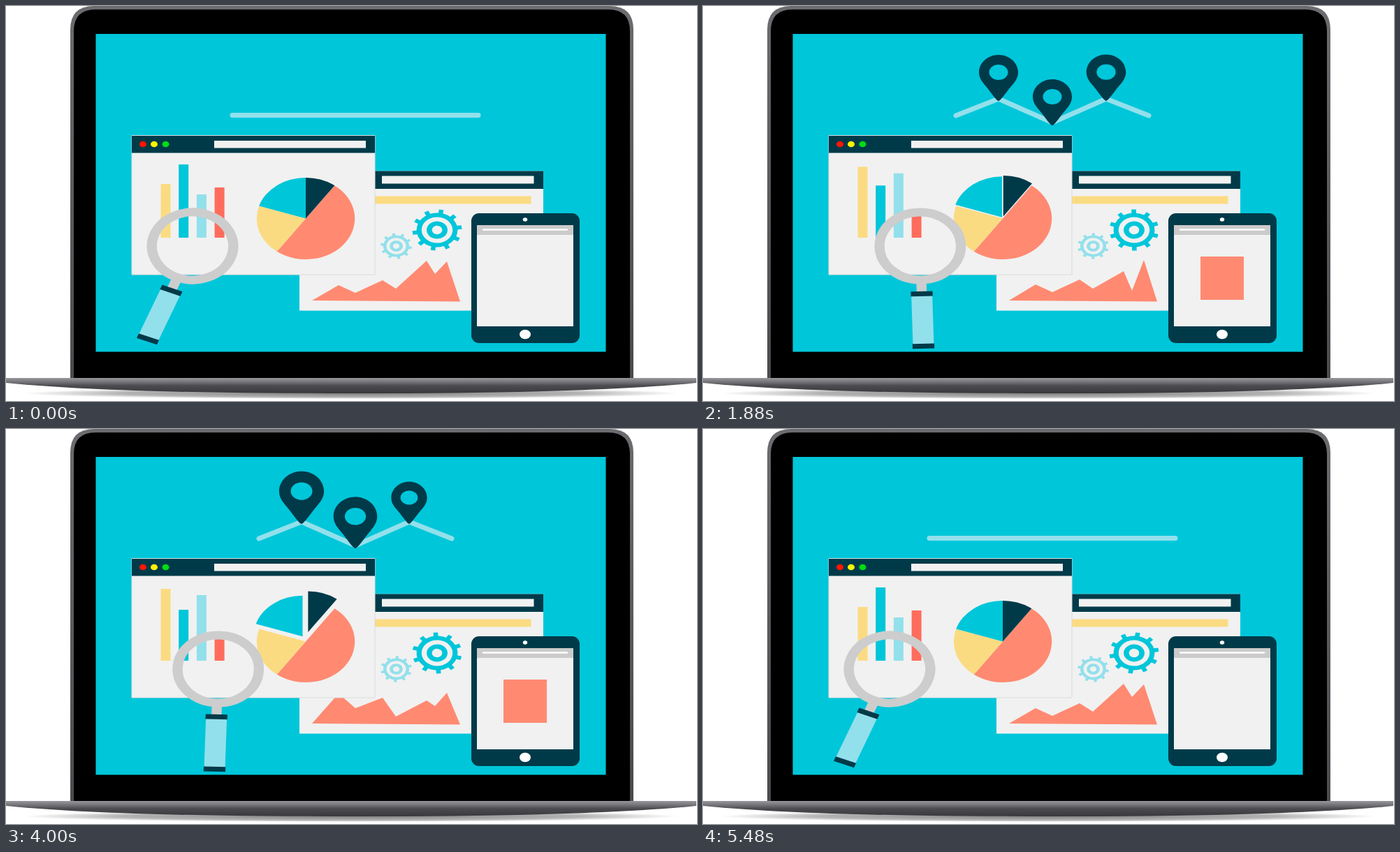
An HTML page for the animation above (5.52 s loop, 989 px wide and 566 px high).

```html
<!DOCTYPE html>
<html lang="en">
<head>
<meta charset="utf-8">
<title>Laptop dashboard</title>
<style>
html, body { margin: 0; width: 100%; height: 100%; overflow: hidden; background: #fff; }
svg { display: block; width: 989px; height: 566px; }
.dark { fill: #003a49; }
.teal { fill: #00c6da; }
.light { fill: #92e0eb; }
.paper { fill: #f1f1f1; }
.yellow { fill: #fbdb82; }
.coral { fill: #ff8a71; }
.red { fill: #ff6c5c; }
</style>
</head>
<body>
<svg viewBox="0 0 989 566">
  <defs>
    <linearGradient id="rim" x2="0" y2="1">
      <stop offset="0" stop-color="#6c6b6f"/><stop offset="1" stop-color="#4b4a4e"/>
    </linearGradient>
    <linearGradient id="base" x2="0" y2="1">
      <stop offset="0" stop-color="#98979b"/><stop offset=".3" stop-color="#6f6e72"/>
      <stop offset=".5" stop-color="#4c4b4f"/><stop offset="1" stop-color="#39383c"/>
    </linearGradient>
    <radialGradient id="shadow">
      <stop offset="0" stop-opacity=".5"/><stop offset=".7" stop-opacity=".3"/>
      <stop offset="1" stop-opacity="0"/>
    </radialGradient>
    <g id="pin">
      <path class="dark" d="M0 0C-3 0 -12 -14 -19 -22C-25 -29 -28 -34 -28 -41C-28 -55 -15 -66 0 -66S28 -55 28 -41C28 -34 25 -29 19 -22C12 -14 3 0 0 0Z"/>
      <ellipse class="teal" cy="-41" rx="13.5" ry="11"/>
    </g>
  </defs>

  <!-- laptop -->
  <ellipse cx="494" cy="555" rx="470" ry="8" fill="url(#shadow)"/>
  <path d="M92 535V34Q92 0 126 0H864Q898 0 898 34V535Z" fill="url(#rim)"/>
  <path d="M97 533V36Q97 5 128 5H862Q893 5 893 36V533Z"/>
  <path d="M0 533H988V540C868 552 688 555 494 555S120 552 0 540Z" fill="url(#base)"/>
  <path class="teal" d="M128.5 40H858.5V495.5H128.5Z"/>

  <polyline id="route" fill="none" stroke="#92e0eb" stroke-width="7" stroke-linecap="round" stroke-linejoin="round"/>
  <g id="pins"></g>

  <!-- back window -->
  <path class="paper" d="M420 236.5H769V436.5H420Z"/>
  <path class="dark" d="M420 236.5H769V262H420Z"/>
  <path class="paper" d="M538 243.5H755.5V254.5H538Z"/>
  <path class="yellow" d="M440 272.5H751.5V283.5H440Z"/>
  <g id="gears" fill="none"></g>
  <polygon id="hills" class="coral"/>

  <!-- front window -->
  <path class="paper" d="M180 185.5H528V385H180Z" stroke="#d8dcdc"/>
  <path class="dark" d="M180 186H528V210.5H180Z"/>
  <path class="paper" d="M298 193H515V203.5H298Z"/>
  <ellipse cx="196" cy="198" rx="5" ry="4.3" fill="#ff1600"/>
  <ellipse cx="212" cy="198" rx="5" ry="4.3" fill="#fff200"/>
  <ellipse cx="228.5" cy="198" rx="5" ry="4.3" fill="#00dc14"/>
  <g id="bars"></g>
  <g id="pie" transform="translate(429 304.5) scale(1.2 1)"></g>

  <!-- tablet -->
  <rect class="dark" x="666" y="297" width="155" height="186" rx="11"/>
  <path class="paper" d="M674 314H812V459H674Z"/>
  <path d="M674 314H812V328H674Z" fill="#cbcbcb"/>
  <path d="M683 320.5H803" stroke="#fff" stroke-width="2.5" stroke-linecap="round"/>
  <ellipse cx="743" cy="306" rx="3.2" ry="2.8" fill="#fff"/>
  <ellipse cx="743" cy="470.5" rx="8" ry="6.7" fill="#fff"/>
  <path id="badge" class="coral" d="M-31 -31H31V31H-31Z"/>

  <g id="lens">
    <path d="M-6 52H6V67H-6Z" fill="#cdcdcd"/>
    <circle r="48.5" fill="none" stroke="#cdcdcd" stroke-width="12"/>
    <path class="light" d="M-12.5 71H12.5V141H-12.5Z"/>
    <path class="dark" d="M-13 65H13V72H-13ZM-13 140H13V147H-13Z"/>
  </g>
</svg>
<script>
const LOOP = 5520;
const $ = id => document.getElementById(id);
const set = (el, name, value) => el.setAttribute(name, value);
const mix = (a, b, p) => a + (b - a) * p;
const ramp = (t, a, b) => Math.min(1, Math.max(0, (t - a) / (b - a)));

// Cubic ease from 0 to 1 between times a and b.
function ease(t, a, b) {
  const u = ramp(t, a, b);
  return u < .5 ? 4 * u ** 3 : 1 - 4 * (1 - u) ** 3;
}

// Eases up from a to b and back down from c to d.
const pulse = (t, a, b, c, d) => ease(t, a, b) - ease(t, c, d);

function add(parent, tag, attrs) {
  const el = document.createElementNS('http://www.w3.org/2000/svg', tag);
  for (const name in attrs) set(el, name, attrs[name]);
  return parent.appendChild(el);
}

const pins = [0, 1, 2].map(() => add($('pins'), 'use', { href: '#pin' }));

function addGear(x, y, size, stroke, dir) {
  const el = add($('gears'), 'g', { stroke });
  add(el, 'circle', { r: 21.5, 'stroke-width': 6 });
  add(el, 'circle', { r: 9.3, 'stroke-width': 6.3 });
  for (let i = 0; i < 10; i++)
    add(el, 'path', { d: 'M0 -23V-29.5', 'stroke-width': 5.5, transform: `rotate(${i * 36})` });
  return { el, dir, place: `translate(${x} ${y}) scale(${1.2 * size} ${size})` };
}
const gears = [addGear(617, 321, 1, '#00c6da', 1), addGear(558.5, 344, .63, '#92e0eb', -1)];

const bars = [['yellow', 77, 103], ['teal', 105, 73], ['light', 62, 94], ['red', 72, 39]]
  .map(([color, from, to], i) => ({
    from, to, el: add($('bars'), 'rect', { x: 221.5 + 25.7 * i, width: 14, class: color })
  }));

let share = .1;
function addSlice(color, part, dx = 0, dy = 0) {
  const rim = () => {
    const a = share * 2 * Math.PI;
    return `${58.5 * Math.sin(a)} ${-58.5 * Math.cos(a)}`;
  };
  const from = rim();
  share += part;
  const d = `M0 0L${from}A58.5 58.5 0 0 1 ${rim()}Z`;
  return { dx, dy, el: add($('pie'), 'path', { d, class: color }) };
}
const slices = [addSlice('coral', .5), addSlice('yellow', .2),
  addSlice('teal', .2, -6.7, -13), addSlice('dark', .1, 5, -24)];

// Ridge vertices and their heights in three poses.
const ridgeX = [476, 500, 539, 558, 602, 614, 631];
const poses = [
  [400, 411, 393, 405, 365, 384, 366],
  [399, 410, 392, 405, 380, 408, 364],
  [379, 400, 385, 412, 389, 397, 378]
];

function drawRoute(t) {
  const bend = pulse(t, 540, 1060, 4200, 4760);
  set($('route'), 'points', [-2, -1, 0, 1, 2].map(i => {
    const n = Math.abs(i);
    return [500 + i * mix(88, 85 - 8 * n, bend), mix(156.5, [167, 133, 157][n], bend)];
  }).join(' '));
}

// Pins pop up left to right and leave right to left, overshooting both ways.
function drawPins(t) {
  pins.forEach((el, i) => {
    const show = 650 + 130 * i, hide = 4000 - 110 * i;
    const size = pulse(t, show, show + 670, hide, hide + 600) * 1.145
      - .145 * pulse(t, show + 670, show + 1070, hide - 400, hide);
    set(el, 'transform', `translate(${423 + 77 * i} ${i === 1 ? 171 : 136}) scale(${size})`);
  });
}

function drawBars(t) {
  const swing = s => pulse(t, s, s + 1220, s + 1220, s + 2440);
  const p = swing(370) + swing(2830);
  for (const bar of bars) {
    const height = mix(bar.from, bar.to, p);
    set(bar.el, 'y', 332 - height);
    set(bar.el, 'height', height);
  }
}

function drawPie(t) {
  const burst = .56 * pulse(t, 1660, 2360, 4080, 4700) + .44 * pulse(t, 1660, 2360, 2520, 3320);
  for (const s of slices)
    set(s.el, 'transform', `translate(${s.dx * burst} ${s.dy * burst})`);
}

function drawHills(t) {
  const toB = ease(t, 530, 1870), toC = ease(t, 2480, 3440), toA = ease(t, 4040, 5180);
  const ridge = ridgeX.map((x, i) => {
    const [a, b, c] = poses.map(pose => pose[i]);
    return [x, mix(mix(a, b, toB), mix(c, a, toA), toC)];
  });
  set($('hills'), 'points', [[438, 422], ...ridge, [650, 423.5]].join(' '));
}

function drawLens(t) {
  const u = ramp(t, 950, 2450) - ramp(t, 3380, 4880);
  const p = (1 - Math.cos(Math.PI * u ** 1.8)) / 2;
  set($('lens'), 'transform',
    `translate(${267 + 115 * p} 344) scale(1.2 1) rotate(${21.8 - 53 * p ** .85})`);
}

function draw(t) {
  drawRoute(t);
  drawPins(t);
  drawBars(t);
  drawPie(t);
  drawHills(t);
  drawLens(t);
  for (const g of gears)
    set(g.el, 'transform', `${g.place} rotate(${g.dir * (10 + 180 * t / LOOP)})`);
  const badge = pulse(t, 200, 900, 4400, 4840) + .12 * pulse(t, 2240, 2640, 2640, 3160);
  set($('badge'), 'transform', `translate(743 390) scale(${badge})`);
}

const start = performance.now();
function tick() {
  draw((performance.now() - start) % LOOP);
  requestAnimationFrame(tick);
}
tick();
</script>
</body>
</html>
```
